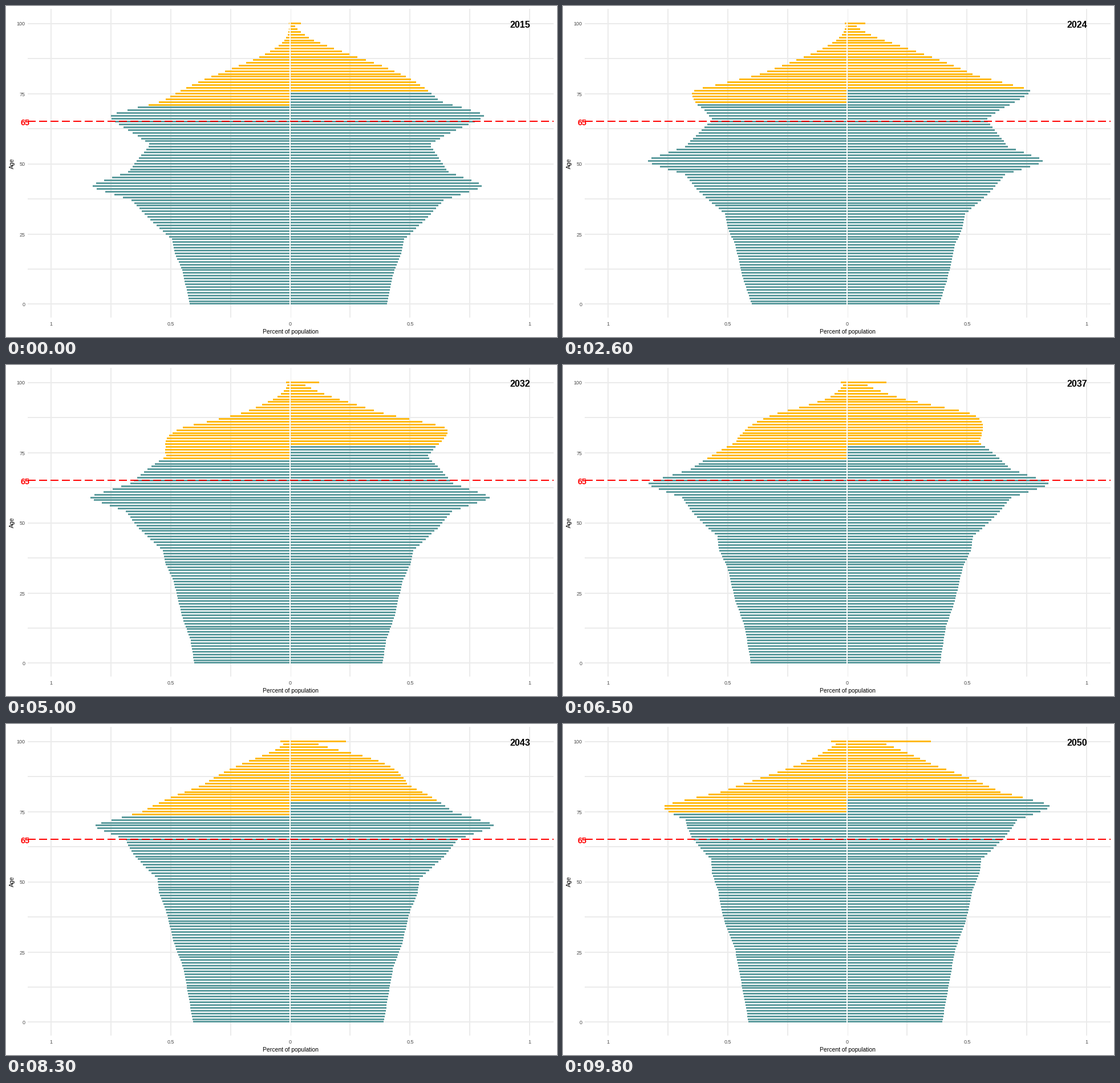
A matplotlib script for the animation above (10 s loop, 966 px wide and 580 px high).

```python
import numpy as np
import matplotlib.pyplot as plt
from matplotlib.animation import FuncAnimation
from matplotlib.collections import PolyCollection

W, H, DPI = 966, 580, 64
PX = 72 / DPI                      # points per pixel
MID, HALF = 498.5, 209.9           # x of zero, width of 0.5 percent
BASE, PITCH = 521.95, 4.914        # y of age 0, height of one year
TEAL, GOLD, GRID = "#5D9C9E", "#FFB90F", "#EBEBEB"
START = 2015
AGES = np.arange(101)

# Turning points of the birth curve: year of birth, bar length in pixels.
BORN, SIZE = zip(
    (1921, 247), (1930, 288), (1942, 302), (1943, 309), (1947, 373),
    (1948, 379), (1949, 371), (1955, 294), (1958, 266), (1959, 265),
    (1968, 291), (1972, 344), (1973, 349), (1974, 341), (1978, 279),
    (1984, 251), (1992, 207), (1997, 202), (2003, 189), (2015, 176),
    (2024, 161.5), (2050, 142))

# hazard at 71.5, its growth per year of age, midlife loss per year,
# share of births (early, late), length and growth of the 100+ bar,
# first age of the gold bars and its rise per year
MEN = dict(hazard=.0208, aging=.116, midlife=.002, share=(1, 1),
           oldest=(2, .0755), gold=(70.4, .115), sign=-1)
WOMEN = dict(hazard=.0099, aging=.127, midlife=.0015, share=(1.005, .966),
             oldest=(19, .0585), gold=(75.65, .1), sign=1)
PROGRESS = .018                    # yearly fall of mortality


def lengths(sex, year):
    """Births, thinned out by Gompertz mortality, as share of the total."""
    born, t = year - AGES, year - START
    births = np.interp(born, BORN, SIZE)
    births = births * np.interp(born, (1942, 1953), sex["share"])
    loss = sex["hazard"] / (sex["aging"] - PROGRESS) * np.exp(
        sex["aging"] * (AGES - 71.5) - PROGRESS * (t - 5))
    loss += sex["midlife"] * np.clip(AGES - 42, 0, 25)
    growth = .0035 * t + .00006 * t ** 2
    out = births * np.exp(growth - loss)
    size, rate = sex["oldest"]
    out[100] = size * np.exp(rate * t)
    return out


def age_y(age):
    """Centre of the pixel row for an age."""
    return np.floor(BASE - PITCH * age) + .5


fig = plt.figure(figsize=(W / DPI, H / DPI), dpi=DPI, facecolor="white")
ax = fig.add_axes([0, 0, 1, 1])
ax.set(xlim=(0, W), ylim=(H, 0))
ax.axis("off")


def line(xs, ys, color, width, z, **kw):
    ax.plot(xs, ys, color=color, lw=width * PX, zorder=z,
            solid_capstyle="butt", **kw)


def label(x, y, s, size, color="black", **kw):
    kw = {"ha": "center", "va": "center_baseline", **kw}
    return ax.text(x, y, s, fontsize=size * PX, color=color, zorder=6,
                   family="Liberation Sans", **kw)


for n in range(-4, 5):
    x = MID + n * HALF / 2
    line([x, x], [5, 546], GRID, 2, 1)
    if n % 2 == 0:
        label(x, 556, f"{abs(n) / 4:g}", 9, "#4D4D4D")
for n in range(9):
    y = age_y(n * 12.5)
    line([38, 960], [y, y], GRID, 2, 1)
    if n % 2 == 0:
        label(33.5, y + .5, f"{n * 12.5:g}", 9, "#4D4D4D", ha="right")

label(498.5, 570, "Percent of population", 10.4)
label(11, 276, "Age", 10.4, rotation=90, va="center")
line([498, 498], [5, 546], "white", 2, 4)
line([38, 960], [202, 202], "red", 2, 5, linestyle=(0, (7, 3)))
label(33, 203.3, "65", 14.5, "red", weight="bold")
year_text = label(901.5, 32, "", 16, weight="bold")

bars = PolyCollection([], linewidths=0, antialiaseds=False, zorder=3)
ax.add_collection(bars, autolim=False)


def draw(i):
    # one year per three ticks, then two ticks for the last years
    step = (i + 1) // 3 if i < 86 else 29 + (i - 86) // 2
    year = START + step
    quads, colors = [], []
    for sex in (MEN, WOMEN):
        ends = np.round(498 + sex["sign"] * lengths(sex, year))
        first, rise = sex["gold"]
        for age, x, y in zip(AGES, ends, age_y(AGES)):
            t, b = y - 1.5, y + 1.5
            quads.append([(498, t), (x, t), (x, b), (498, b)])
            colors.append(GOLD if age >= first + rise * step else TEAL)
    bars.set_verts(quads)
    bars.set_facecolor(colors)
    year_text.set_text(str(year))
    return bars, year_text


anim = FuncAnimation(fig, draw, frames=100, interval=100, repeat=True,
                     repeat_delay=0, blit=False)
plt.show()
```
